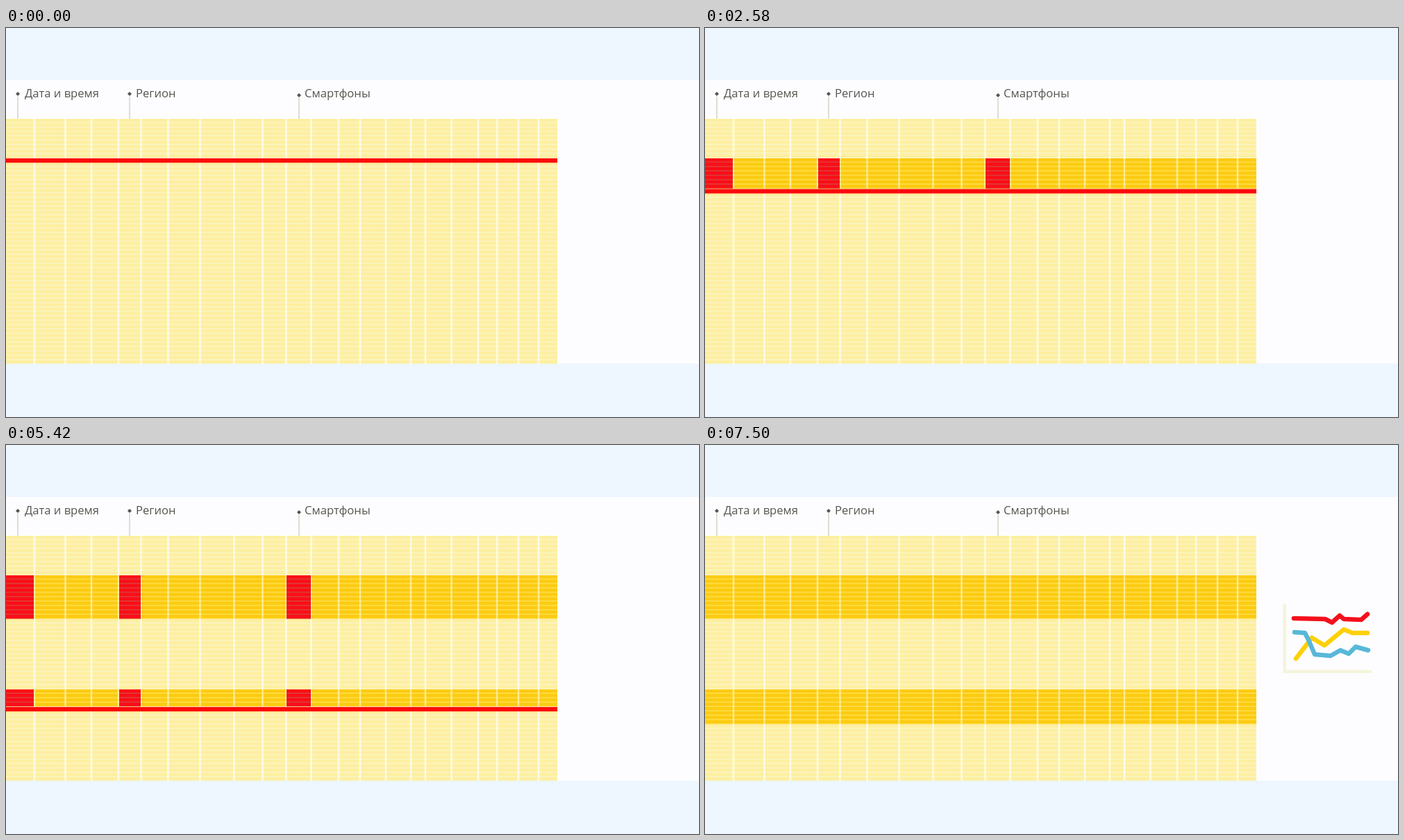
These frames come from a looping animation (998 by 561 pixels, 7580 ms). An HTML page with a canvas:

```html
<!DOCTYPE html>
<html lang="ru">
<head>
<meta charset="utf-8">
<style>
  html, body { margin: 0; width: 100%; height: 100%; overflow: hidden; background: #eef6ff; }
  canvas { display: block; }
</style>
</head>
<body>
<canvas id="stage" width="998" height="561"></canvas>
<script>
const ctx = document.getElementById('stage').getContext('2d');
const LOOP = 7580, BEAT = 1000 / 3;
const TABLE = { top: 131, bottom: 484, right: 794 }, PITCH = 6.33;
const DIVIDERS = [41, 85.5, 123, 162, 194.5, 233.5, 279.5, 328.5, 369.5, 403.5, 439.5,
  479, 510, 547, 583, 604, 641.5, 680, 707, 738, 767];
const MATCHES = [[0, 40], [163, 194], [404, 439]];
const LABELS = [['Дата и время', 17, 95, 27], ['Регион', 178, 95, 187], ['Смартфоны', 422, 97, 430]];
const BANDS = [
  { first: 9, rows: 10, start: 0, end: 3826 },
  { first: 35, rows: 8, start: 4000, end: 6996 }
];
const CURVES = [
  ['#f50f1c', [848,250, 893,251, 903,256, 914,246, 920,251, 945,252, 954,244]],
  ['#fed008', [851,308, 874,278, 892,289, 920,266, 932,271, 954,271]],
  ['#58b8d8', [849,270, 864,271, 869,281, 878,302, 901,304, 915,296, 927,301, 937,291, 955,296]]
];

const rowY = row => TABLE.top + row * PITCH;
const clamp = (v, lo, hi) => Math.min(hi, Math.max(lo, v));

function rect(color, x, y, w, h) {
  ctx.fillStyle = color;
  ctx.fillRect(x, y, w, h);
}

function drawRows(x, right, first, count, fill, gap) {
  if (!count) return;
  const top = rowY(first), bottom = Math.min(rowY(first + count) - 0.8, TABLE.bottom);
  rect(fill, x, top, right - x, bottom - top);
  for (let i = 1; i <= count; i++) {
    const y = rowY(first + i) - 1.8;
    if (y + 1.8 <= bottom + 1) rect(gap, x, y, right - x, Math.min(1.8, bottom - y));
  }
}

function drawDividers(color, top, bottom) {
  for (const x of DIVIDERS) rect(color, x - 1.25, top, 2.5, bottom - top);
}

function drawLabel([text, x, y, textX]) {
  ctx.fillStyle = '#55554f';
  ctx.beginPath();
  ctx.moveTo(x, y - 3);
  ctx.lineTo(x + 3, y);
  ctx.lineTo(x, y + 3);
  ctx.lineTo(x - 3, y);
  ctx.fill();
  ctx.font = '16.6px "Open Sans", "Noto Sans", sans-serif';
  ctx.fillText(text, textX, 99.5);
  for (let dot = y + 4; dot < TABLE.top; dot += 2) rect('#b9b7a0', x - 0.7, dot, 1.4, 1.3);
}

function drawBand(band, t, matchAlpha) {
  const active = t >= band.scanFrom && t < band.end;
  const step = clamp(Math.floor((t - band.start) / BEAT), 0, band.rows - 1);
  const done = t >= band.end ? band.rows : active ? step : 0;
  if (done) {
    drawRows(0, TABLE.right, band.first, done, '#fccb10', '#ffdc46');
    drawDividers('rgba(255,246,190,.72)', rowY(band.first), rowY(band.first + done) - 0.8);
    ctx.globalAlpha = matchAlpha;
    for (const [x, right] of MATCHES) drawRows(x, right, band.first, done, '#fb0d18', '#dd3a34');
    ctx.globalAlpha = 1;
  }
  if (active) {
    const y = rowY(band.first + step + 0.5);
    rect('rgba(255,120,80,.35)', 0, y - 4, TABLE.right, 8);
    rect('#fb0a0a', 0, y - 3, TABLE.right, 6);
  }
}

function drawChart(alpha) {
  ctx.globalAlpha = alpha;
  rect('#f4f4dc', 832.5, 229, 4.5, 100);
  rect('#f4f4dc', 832.5, 324.5, 127.5, 4.5);
  ctx.lineWidth = 6.5;
  ctx.lineCap = ctx.lineJoin = 'round';
  for (const [color, points] of CURVES) {
    ctx.strokeStyle = color;
    ctx.beginPath();
    for (let i = 0; i < points.length; i += 2) ctx.lineTo(points[i], points[i + 1]);
    ctx.stroke();
  }
  ctx.globalAlpha = 1;
}

// The second scan begins as soon as the first one is finished.
BANDS[0].scanFrom = 0;
BANDS[1].scanFrom = BANDS[0].end;

function draw(now) {
  const t = now % LOOP + 4;
  const reveal = clamp(Math.floor((t - 7330) / 83 + 1) / 3, 0, 1);
  rect('#eef6ff', 0, 0, 998, 561);
  rect('#fdfdff', 0, 75, 998, 409);
  LABELS.forEach(drawLabel);
  drawRows(0, TABLE.right, 0, 56, '#fdefa0', '#fcf3c0');
  drawDividers('#fffbe2', TABLE.top, TABLE.bottom);
  for (const band of BANDS) drawBand(band, t, 1 - reveal);
  if (reveal) drawChart(reveal);
}

const began = performance.now();
function tick() {
  draw(performance.now() - began);
  requestAnimationFrame(tick);
}
tick();
</script>
</body>
</html>
```
